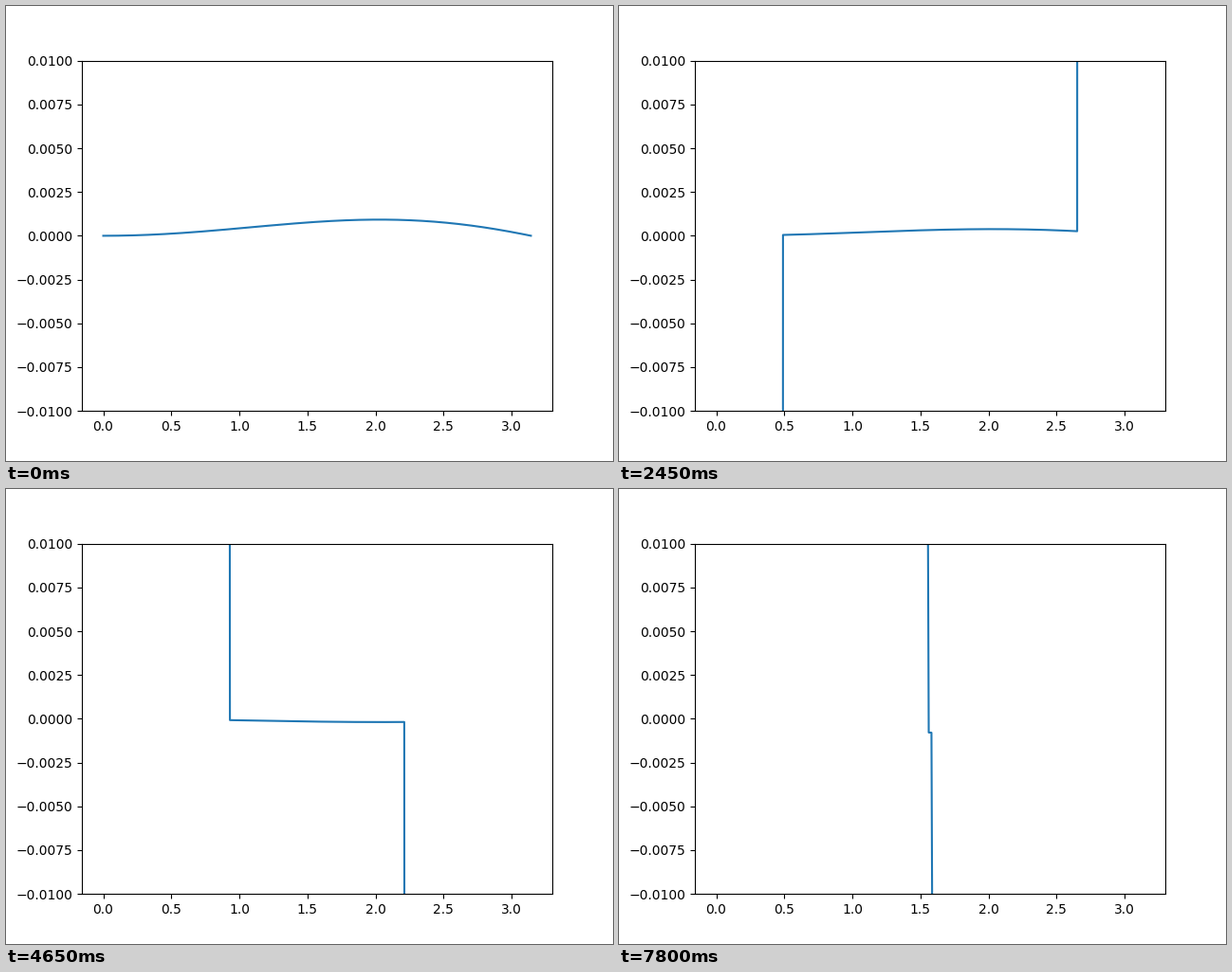
A matplotlib script that plays this animation: 640 px wide and 480 px high, repeating every 7.85 s.

```python
import numpy as np
import matplotlib.pyplot as plt
from matplotlib.animation import FuncAnimation

H = 0.01          # grid step in space and time
N = 315           # points across [0, pi]
FRAMES = 157

idx = np.arange(N)
x = np.linspace(0, np.pi, N)


def error(n):
    """Grid solution minus exact standing wave at time n * H."""
    t = n * H
    amp = np.cos(t) - np.sin(t)
    # the grid solution is only known inside the shrinking triangle
    known = (idx >= n) & (idx <= N - 1 - n)
    grid = np.where(known, amp * np.cos(idx * H), 0)
    return grid - amp * np.cos(x)


fig, ax = plt.subplots(figsize=(6.4, 4.8), dpi=100)
line, = ax.plot(x, error(0))
ax.set_ylim(-0.01, 0.01)


def update(n):
    line.set_ydata(error(n))
    return line,


anim = FuncAnimation(fig, update, frames=FRAMES, interval=50,
                     repeat=True, repeat_delay=0)
plt.show()
```
